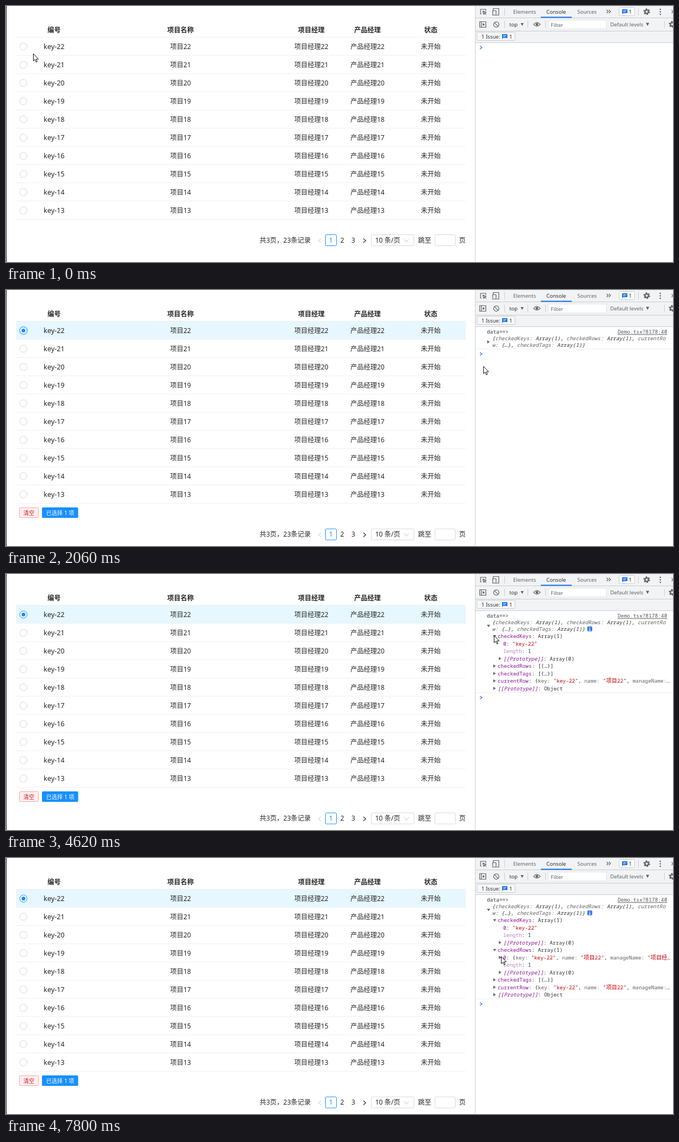
Animation, 1206 px wide and 464 px high, one loop 8 s. Source, as an HTML page:

```html
<!DOCTYPE html>
<html lang="zh-CN">
<head>
<meta charset="utf-8">
<title>Table and console</title>
<style>
html, body { margin: 0; width: 100%; height: 100%; overflow: hidden; background: #fff; }
svg { display: block; width: 1206px; height: 464px; }
text { white-space: pre; font: 12px "Noto Sans", "Noto Sans CJK SC", "Noto Sans CJK", sans-serif; fill: #262626; }
.mid { text-anchor: middle; }
.head { font-weight: 700; }
.key { font-size: 12.4px; }
.tag { font-size: 10px; }
.ui { font-size: 9.5px; fill: #5f6368; }
.dark { fill: #303134; }
.log text { font: 9.33px "Noto Sans Mono", "Noto Sans CJK SC", "Noto Sans CJK", monospace; fill: #303134; }
.log .it { font-style: italic; }
.log .link { text-decoration: underline; fill: #545454; }
.p { fill: #881391; }
.dim { fill: #b97fc0; }
.g { fill: #606060; }
.s { fill: #c80000; }
.n { fill: #1a1aa6; }
.han { font-size: 10px; }
.tri { fill: #6e6e6e; }
.line { fill: none; stroke: #5f6368; stroke-width: 1.2; }
.chev { fill: none; stroke: #3b7de9; stroke-width: 1.4; }
.box { fill: #fff; stroke: #d9d9d9; }
</style>
</head>
<body>
<svg viewBox="0 0 1206 464">
  <rect width="1" height="464" fill="#222"/>
  <rect id="row" x="18" y="57" width="813" height="33"/>
  <g id="table"></g>
  <g id="radio">
    <circle id="ring" cx="31.5" cy="73.5" r="7.8" fill="none" stroke="#1890ff" stroke-width="2" opacity=".14"/>
    <circle id="rim" cx="31.5" cy="73.5" r="6.5" fill="#fff"/>
    <circle id="dot" cx="31.5" cy="73.5" fill="#1890ff"/>
  </g>
  <g id="tags">
    <rect x="24.5" y="394.5" width="34" height="18" rx="1.5" fill="#fff1f0" stroke="#ffa39e"/>
    <rect x="65" y="394" width="65.500" height="19" rx="2" fill="#1890ff"/>
    <text class="tag mid" x="41.500" y="407.500" style="fill:#cf1322">清空</text>
    <text class="tag mid" x="98" y="407.500" style="fill:#fff;font-weight:500">已选择 1 项</text>
  </g>
  <g id="pager">
    <rect class="box" x="577.5" y="414.5" width="20" height="20" rx="2" style="stroke:#1890ff"/>
    <rect class="box" x="660.5" y="414.5" width="77" height="20" rx="2"/>
    <rect class="box" x="775.5" y="414.5" width="37" height="20" rx="2"/>
    <path d="M569.500 421.500L565 425.200L569.500 429" fill="none" stroke="#c4c4c4"/>
    <path d="M646 421.500L650.500 425.200L646 429" fill="none" stroke="#333" stroke-width="1.2"/>
    <path d="M720 422.500L724 428L728 422.500" fill="none" stroke="#c4c4c4"/>
    <text x="458.500" y="428.500">共3页，23条记录</text>
    <text class="mid" x="587.500" y="428.500" style="fill:#1890ff">1</text>
    <text class="mid" x="608" y="428.500">2</text>
    <text class="mid" x="628" y="428.500">3</text>
    <text x="667.500" y="428.500">10 条/页</text>
    <text x="745" y="428.500">跳至</text>
    <text x="819" y="428.500">页</text>
  </g>

  <rect x="848" width="358" height="464" fill="#fff"/>
  <rect x="848" width="358" height="66" fill="#f1f3f4"/>
  <path d="M848.500 0V464M849 21.500H1206M849 45.500H1206M849 66.500H1206M901.500 4V17M901.500 27V40M943.500 27V40M975.500 27V40M1143.500 4V17M1190.500 27V40" fill="none" stroke="#cacdd1"/>
  <rect x="967" y="19.500" width="56" height="2" fill="#1a73e8"/>
  <g class="line">
    <path d="M860 14.500H858V6H867.500V9"/>
    <path d="M862 9L868 11.500L865.500 12.500L868 15.500M862 9L864 15L865.500 12.500"/>
    <path d="M881 8V4.500H891V16.500H887M880 8.500H886V16.500H880Z"/>
    <path d="M1086 7L1089 10L1086 13M1090 7L1093 10L1090 13"/>
    <path d="M1203.500 7.500L1209 13M1203.500 13L1209 7.500"/>
    <path d="M856.500 28.500H867.500V38.500H856.500ZM859.500 28.500V38.500"/>
    <circle cx="886.500" cy="33.500" r="4.800"/>
    <path d="M883.200 30.200L889.800 36.800"/>
    <path d="M954 33.300Q960 26.500 966 33.300Q960 40 954 33.300Z"/>
  </g>
  <g fill="#5f6368">
    <path d="M862 31L866 33.500L862 36Z"/>
    <circle cx="960" cy="33.300" r="2.300"/>
    <circle cx="1183" cy="6" r="1.300"/><circle cx="1183" cy="10.500" r="1.300"/><circle cx="1183" cy="15" r="1.300"/>
    <path d="M930.500 31H936L933.250 36ZM1157 30.500H1163L1160 36Z"/>
  </g>
  <g id="gears" fill="none" stroke="#5f6368"></g>
  <rect x="1108.5" y="2.500" width="28" height="15" rx="2" fill="#fafbfb" stroke="#cacdd1"/>
  <rect x="980.5" y="25.500" width="105" height="16" fill="#fff" stroke="#e3e5e7"/>
  <rect x="851.5" y="47.500" width="69" height="15" rx="2" fill="#f5f6f7" stroke="#cacdd1"/>
  <g id="bar"></g>
  <g id="logs" class="log"></g>
  <path id="prompt" class="chev" d="M857 -2.800L860.500 0L857 2.800"/>

  <g id="cursor" fill="#fff" stroke="#111" stroke-linejoin="round">
    <path id="arrow" d="M.5 .5V13.500L3.500 10.800L5.600 15.800L7.600 14.900L5.500 10.200H9.600Z"/>
    <path id="hand" d="M4.600 12V2.400C4.600 .4 7.200 .4 7.200 2.400V8C7.500 6.900 9.500 7 9.600 8.400C10.100 7.500 11.600 7.800 11.700 9.100C12.300 8.500 13.300 8.900 13.300 10V14C13.300 16 11.900 17.500 11.900 20H5.600C5.400 17.500 2.600 15 1.200 12.500C.3 10.800 2 10 3.100 11Z"/>
  </g>
</svg>
<script>
const $ = id => document.getElementById(id);
const text = (x, y, s, cls = '') => `<text x="${x}" y="${y}" class="${cls}">${s}</text>`;
const span = cls => s => `<tspan class="${cls}">${s}</tspan>`;
const show = (id, on) => $(id).setAttribute('display', on ? 'inline' : 'none');

// Table
const columns = [
  [87, '编号', n => 'key-' + n],
  [315.5, '项目名称', n => '项目' + n],
  [552, '项目经理', n => '项目经理' + n],
  [653.5, '产品经理', n => '产品经理' + n],
  [768, '状态', () => '未开始'],
];
const rule = y => `<rect x="18" y="${y}" width="813" height="1" fill="#f0f0f0"/>`;
let table = rule(56) + columns.map(([x, title]) => text(x, 47.5, title, 'mid head')).join('');
for (let i = 0; i < 10; i++) {
  const y = 73 + 33 * i;
  table += rule(y + 16);
  columns.forEach(([x, , cell], c) => table += text(x, y + 4.5, cell(22 - i), c ? 'mid' : 'mid key'));
  if (i) table += `<circle cx="31.5" cy="${y + .5}" r="6.500" fill="#fff" stroke="#d9d9d9"/>`;
}
$('table').innerHTML = table;

// Toolbar
const gear = (x, y) => `<circle cx="${x}" cy="${y}" r="3.200" stroke-width="2.400"/>
  <circle cx="${x}" cy="${y}" r="5.100" stroke-width="1.800" stroke-dasharray="2.670"/>`;
const bubble = (x, y) => `<path d="M${x} ${y}h9.500v7h-7.500l-2 2z" fill="#1a73e8"/>
  <path d="M${x + 2} ${y + 2.500}h5.500M${x + 2} ${y + 4.700}h4" stroke="#fff" stroke-width=".9"/>`;
$('gears').innerHTML = gear(1158.5, 10.3) + gear(1204.5, 33.3);
$('bar').innerHTML = bubble(1114, 6) + bubble(897, 51) + [
  [917, 13.8, 'Elements'], [977, 13.8, 'Console', 'dark'], [1033, 13.8, 'Sources'],
  [1126, 13.8, '1', 'dark'], [910, 37, 'top', 'dark'], [985, 37.5, 'Filter'],
  [1092.5, 37, 'Default levels'], [859.5, 58.5, '1 Issue:', 'dark'], [910, 58.5, '1', 'dark'],
].map(([x, y, s, c = '']) => text(x, y, s, 'ui ' + c)).join('');

// Console: each line is [depth, markup, arrow]
const p = span('p'), dim = span('dim'), g = span('g'), str = span('s'), num = span('n'), it = span('p it');
const han = s => s.replace(/[\u4e00-\u9fff]+/g, span('han'));
const proto = (depth, kind) => [depth, it('[[Prototype]]') + ': ' + kind, 'r'];
const size = [2, dim('length') + ': ' + num(1)];
const record = '{' + g('key: ') + str('"key-22"') + ', ' + g('name: ') + str('"项目22"') + ', ' + g('manageName:');
const opened = (name, first) => [[1, p(name) + ': Array(1)', 'd'], first, size, proto(2, 'Array(0)')];
const closed = (name, value) => [[1, p(name) + ': ' + value, 'r']];

function lines(level) {
  if (level < 2) return [];
  return [
    ...(level > 2 ? opened('checkedKeys', [2, p('0') + ': ' + str('"key-22"')])
                  : closed('checkedKeys', '[' + str('"key-22"') + ']')),
    ...(level > 3 ? opened('checkedRows', [2, p('0') + ': ' + record + ' ' + str('"项目经…'), 'r'])
                  : closed('checkedRows', '[{…}]')),
    ...closed('checkedTags', '[{…}]'),
    ...closed('currentRow', record + g('…')),
    proto(1, 'Object'),
  ];
}
const triangle = (x, y, dir) =>
  `<path class="tri" d="M${dir === 'd' ? `${x - .5} ${y - 2}h6l-3 4.500z` : `${x} ${y - 3}l4.800 3l-4.800 3z`}"/>`;
const endOf = level => level < 2 ? 106.5 : 106.5 + 13.5 * lines(level).length;

function log(level) {
  let out = text(869.5, 79.3, 'data==&gt;') + text(1106, 79.3, 'Demo.tsx?8178:40', 'link')
    + text(879, 91.3, '{' + g('checkedKeys: ') + 'Array(1), ' + g('checkedRows: ') + 'Array(1), ' + g('currentRo'), 'it')
    + text(879, 103.2, g('w: ') + '{…}, ' + g('checkedTags: ') + 'Array(1)}', 'it')
    + triangle(870, 94, level > 1 ? 'd' : 'r')
    + `<rect x="849" y="${endOf(level)}" width="357" height="1" fill="#f0f0f0"/>`;
  if (level > 1) out += `<rect x="1051" y="95" width="9" height="9" rx="2" fill="#3f7ee8"/>
    <path d="M1055.500 96.300v1.400M1054.500 99h1v3.500M1054 102.500h3" fill="none" stroke="#fff"/>`;
  lines(level).forEach(([depth, s, dir], i) => {
    const y = 112.8 + 13.5 * i, x = 879 + 10 * depth;
    out += text(x, y + 3.2, han(s)) + (dir ? triangle(x - 8, y, dir) : '');
  });
  return `<g id="log${level}">${out}</g>`;
}
$('logs').innerHTML = [1, 2, 3, 4].map(log).join('');

// Timeline: the value holds until the next time
const at = (track, t) => track.filter(k => k[0] <= t).pop();
const pointer = [
  [0, 49, 86], [120, 46, 84], [270, 38, 79], [420, 25, 73, 'hand'], [1330, 48, 74],
  [1640, 110, 76], [1790, 330, 88], [1930, 660, 118], [2060, 863, 138], [2210, 892, 120],
  [2340, 880, 102], [2480, 871, 90], [2760, 872, 94],
  [3880, 874, 99], [4000, 879, 106], [4130, 882, 111], [4640, 883, 119], [4770, 885, 131],
  [4920, 891, 138], [5050, 893, 147], [5200, 889, 157], [5350, 884, 164], [5490, 882, 166],
  [5900, 883, 171], [6030, 884, 180], [6160, 886, 190], [6300, 888, 198], [6430, 889, 202],
  [6570, 892, 194], [6700, 894, 185], [6850, 895, 184], [6970, 894, 183],
  [7530, 895, 197], [7660, 894, 188], [7800, 895, 178],
];
const level = [[0, 0], [940, 1], [3750, 2], [4390, 3], [5770, 4]];
const fill = [[0, 'none'], [940, '#f1f9fc'], [1090, '#eaf7fe'], [1210, '#e6f7ff']];
const dot = [[0, 0], [1090, 2], [1210, 3], [1330, 3.5]];

const start = performance.now();
function draw() {
  const t = (performance.now() - start) % 8000;
  const [, x, y, shape] = at(pointer, t);
  const open = at(level, t)[1];
  $('cursor').setAttribute('transform', `translate(${x} ${y})`);
  show('arrow', !shape);
  show('hand', shape);
  $('row').setAttribute('fill', at(fill, t)[1]);
  $('rim').setAttribute('stroke', t < 420 ? '#d9d9d9' : '#1890ff');
  $('dot').setAttribute('r', at(dot, t)[1]);
  show('ring', t >= 940 && t < 3750);
  show('tags', open);
  $('pager').setAttribute('transform', `translate(0 ${open ? 18.5 : 0})`);
  for (let i = 1; i < 5; i++) show('log' + i, i === open);
  $('prompt').setAttribute('transform', `translate(0 ${open ? endOf(open) + 9.5 : 75.3})`);
  requestAnimationFrame(draw);
}
draw();
</script>
</body>
</html>
```
